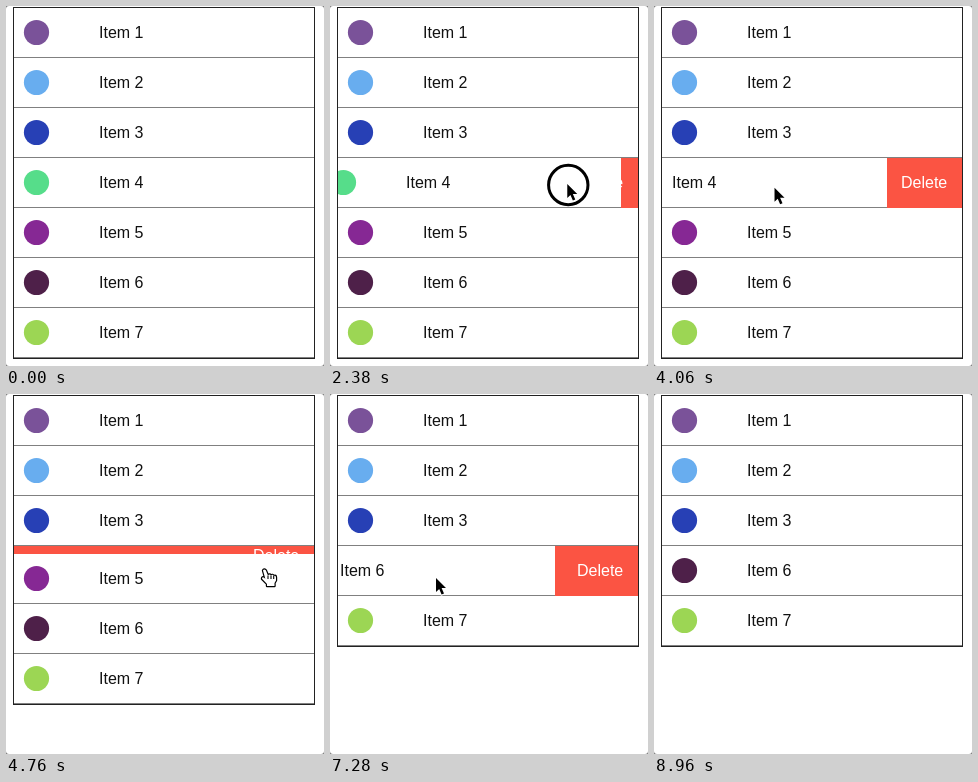
Animation, 318 px wide and 360 px high, one loop 9.1 s. Source, as an HTML page with a canvas:

```html
<!DOCTYPE html>
<html lang="en">
<head>
<meta charset="utf-8">
<title>Swipe to delete</title>
<style>
  html, body { margin: 0; height: 100%; overflow: hidden; background: #fff; }
  canvas { display: block; }
</style>
</head>
<body>
<canvas id="stage" width="318" height="360"></canvas>
<script>
const ctx = document.getElementById('stage').getContext('2d');
const LOOP = 9100, STEP = 70, SPRING = 350;
const LEFT = 8, RIGHT = 308, TOP = 2, WIDTH = RIGHT - LEFT, ROW = 50, BUTTON = 75;
const COLORS = ['#7a5299', '#68adef', '#2740b5', '#56dd8a', '#862894', '#4e2049', '#9cd654'];

// Pointer moves: start, end, x, y
const MOVES = [
  [70, 840, 264, 178], [1120, 1260, 254, 177], [2240, 2500, 224, 177],
  [3010, 3150, 213, 177], [3500, 3740, 112, 181], [4000, 4410, 259, 175],
  [5040, 5250, 260, 180], [5380, 5530, 31, 182], [6230, 6930, 196, 184],
  [7060, 7200, 106, 183], [8120, 8260, 187, 186], [8400, 8940, 230, 362]
];
// Presses: down, up, row index
const PRESSES = [
  [1260, 1610, 3], [2230, 2520, 3], [3490, 3790, 3], [4470, 4550, 3],
  [5380, 5560, 4], [7060, 7210, 5], [8110, 8270, 5]
];

const clamp = v => Math.min(1, Math.max(0, v));
const mix = (a, b, p) => a + (b - a) * p;
const smooth = p => p * p * (3 - 2 * p);
const easeOut = (p, power) => 1 - (1 - clamp(p)) ** power;

function pointerAt(t) {
  let x = 296, y = 310;
  for (const [start, end, toX, toY] of MOVES) {
    const p = smooth(clamp((t - start) / (end - start)));
    x = mix(x, toX, p);
    y = mix(y, toY, p);
  }
  return { x, y };
}

// Rows follow the pointer while pressed, then spring closed, open or away.
function rowState(row, t) {
  let rest = 0, offset = 0, dragged = 0, height = ROW;
  for (const [down, up, target] of PRESSES) {
    if (target !== row || t < down) continue;
    const from = pointerAt(down).x;
    const onButton = rest < 0 && from > RIGHT + rest;
    dragged = Math.min(0, rest + pointerAt(Math.min(t, up)).x - from);
    offset = dragged;
    if (t < up) break;
    const p = (t - up) / SPRING;
    const removed = onButton || dragged < -200;
    rest = removed ? -2 * WIDTH : dragged < -BUTTON / 2 ? -BUTTON : 0;
    offset = mix(dragged, rest, easeOut(p, 3));
    if (removed) height = Math.round(ROW * (1 - easeOut(p, 2)));
  }
  return { offset: Math.round(offset), dragged, height };
}

function rect(color, x, y, w, h) {
  ctx.fillStyle = color;
  ctx.fillRect(x, y, w, h);
}

function label(text, color, x, middle) {
  ctx.fillStyle = color;
  ctx.fillText(text, x, middle + 5.5);
}

function drawRow(i, y, { offset, dragged, height }) {
  ctx.save();
  ctx.beginPath();
  ctx.rect(LEFT, y, WIDTH, height);
  ctx.clip();
  if (offset < 0) {
    rect('#fb5443', LEFT, y, WIDTH, height);
    // A full swipe carries the label along with the row's edge.
    const shift = clamp((-dragged - 150) / 50) * (dragged + BUTTON);
    label('Delete', '#fff', RIGHT - BUTTON + 14 + shift, y + Math.max(10, height / 2) - 0.5);
  }
  const x = LEFT + offset;
  rect('#fff', x, y, WIDTH, height);
  rect('#808080', x, y + height - 1, WIDTH, 1);
  ctx.fillStyle = COLORS[i];
  ctx.beginPath();
  ctx.arc(x + 22.5, y + 24.5, 12.6, 0, 7);
  ctx.fill();
  label('Item ' + (i + 1), '#111', x + 85, y + 24.5);
  ctx.restore();
}

const ARROW = new Path2D('M0 0V14L3.2 11L5.6 16.5L8 15.5L5.6 10.1H10Z');
const HAND = new Path2D('M-2 1.5Q-1 -.5 .8 1.3L3 6.5Q4.5 4.500 6 6.500Q7.500 5 8.700 7' +
  'Q11 6 11 8.500V11.500L9.500 14V17H2V15L-3 9.800Q-3 7.700 -1.300 8.500L.3 9.800Z');
const FINGERS = new Path2D('M3 6.500V10M6 6.500V10M8.700 7V10');

function drawPointer(t) {
  if (t < STEP || t >= 8960) return;
  const { x, y } = pointerAt(t);
  if (PRESSES.some(([down, up]) => t >= down && t < up)) {
    ctx.strokeStyle = '#000';
    ctx.lineWidth = 3;
    ctx.beginPath();
    ctx.arc(x + 1, y + 2, 19.7, 0, 7);
    ctx.stroke();
  }
  const hand = t >= 4270 && t < 5110;
  const shape = hand ? HAND : ARROW;
  ctx.save();
  ctx.translate(x, y + (hand ? 0 : 1));
  ctx.lineJoin = 'round';
  ctx.lineWidth = 2.4;
  ctx.strokeStyle = hand ? '#000' : '#fff';
  ctx.fillStyle = hand ? '#fff' : '#000';
  ctx.stroke(shape);
  ctx.fill(shape);
  if (hand) {
    ctx.lineWidth = 1.1;
    ctx.stroke(FINGERS);
  }
  ctx.restore();
}

function draw(t) {
  rect('#777', 0, 0, 318, 360);
  ctx.fillStyle = '#fff';
  ctx.beginPath();
  ctx.roundRect(0, 0, 318, 360, 3);
  ctx.fill();
  ctx.font = '16px "Liberation Sans", Arial, sans-serif';

  let y = TOP;
  COLORS.forEach((_, i) => {
    const state = rowState(i, t);
    if (state.height) drawRow(i, y, state);
    y += state.height;
  });
  ctx.strokeStyle = '#222';
  ctx.lineWidth = 1;
  ctx.strokeRect(LEFT - 0.5, TOP - 0.5, WIDTH + 1, y - TOP + 1);
  drawPointer(t);
}

function tick() {
  const t = performance.now() % LOOP;
  draw(Math.floor(t / STEP) * STEP);
  requestAnimationFrame(tick);
}
tick();
</script>
</body>
</html>
```
